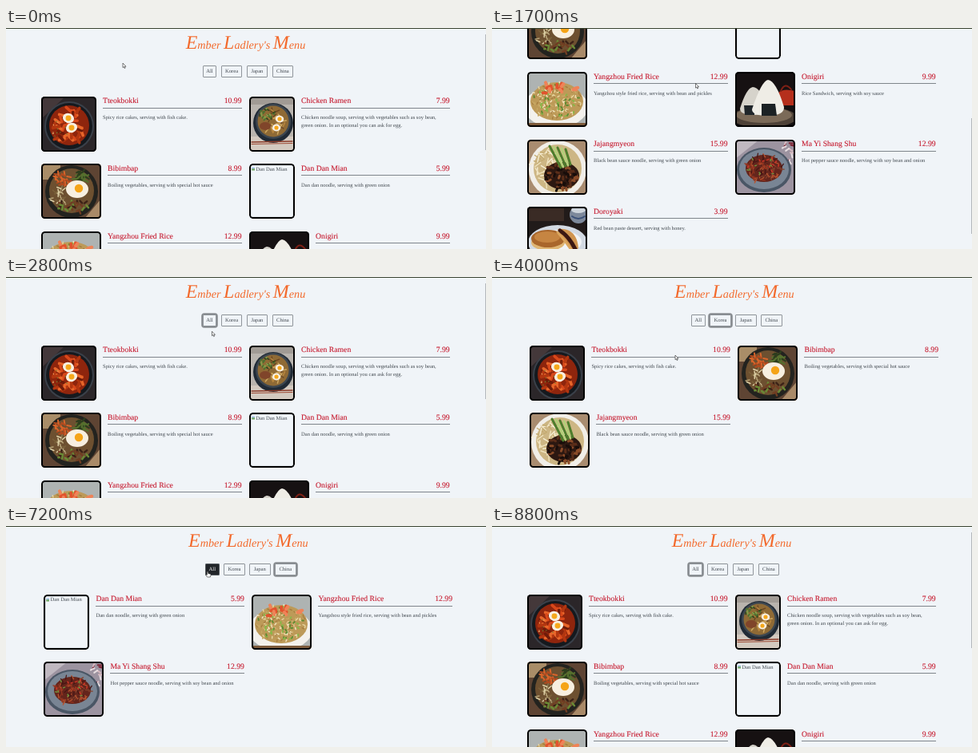
Animation, 600 px wide and 277 px high, one loop 8.9 s. Source, as an HTML page:

```html
<!DOCTYPE html>
<html lang="en">
<head>
<meta charset="utf-8">
<title>Menu</title>
<style>
html, body { margin: 0; width: 100%; height: 100%; overflow: hidden; background: #f0f4f8; }
#stage { position: relative; width: 600px; height: 277px; overflow: hidden; background: #f0f4f8;
  font: 6.6px/9.6px "Liberation Serif", serif; color: #41484f; text-rendering: geometricPrecision; }
#stage * { box-sizing: border-box; }
#page, #view { position: absolute; left: 0; top: 0; width: 600px; height: 500px; }
h1 { position: absolute; left: 200px; top: 7.6px; width: 199px; margin: 0; text-align: center; white-space: nowrap;
  font: italic 14.2px/28px "Liberation Serif", serif; color: #f3692b; }
h1 b { font-size: 24px; font-weight: 400; line-height: 20px; }
.btn { position: absolute; top: 47px; height: 15.4px; text-align: center; line-height: 16px; color: #41484f;
  border-radius: 2px; box-shadow: inset 0 0 0 .7px #6a7076; }
.btn.focus { box-shadow: inset 0 0 0 .7px #6a7076, 0 0 0 1.8px rgba(33, 37, 41, .5); }
.btn.hover { background: #212529; color: #fff; }
.card { position: absolute; height: 69px; width: 250.5px; white-space: pre; }
.pic { position: absolute; left: 0; top: 0; height: 69px; border-radius: 4.5px; overflow: hidden; }
.pic svg { display: block; }
.pic::after { content: ""; position: absolute; inset: 0; border: 2px solid #000; border-radius: 4.5px; }
.head { position: absolute; right: 0; top: .7px; height: 14.3px; display: flex; justify-content: space-between;
  font-size: 9.7px; line-height: 12px; color: #c5172c; -webkit-text-stroke: .1px;
  border-bottom: 1px solid #7f858b; }
.desc { position: absolute; top: 22.6px; }
.alt { position: absolute; left: 8.2px; top: 2.4px; }
#bar { position: absolute; left: 598.8px; width: 1.2px; height: 145px; background: #b4b8bc; }
#edge { position: absolute; left: 0; top: 0; width: 600px; height: 1.2px; background: #39432f; }
#mouse { position: absolute; left: 0; top: 0; overflow: visible; }
</style>
</head>
<body>
<div id="stage">
  <div id="page">
    <div id="view"><h1><b>E</b>mber <b>L</b>adlery's <b>M</b>enu</h1></div>
  </div>
  <div id="bar"></div>
  <div id="edge"></div>
  <svg id="mouse" width="10" height="10">
    <path id="arrow" d="M0 0V5.6L1.3 4.5L2.2 6.5L3.1 6.1L2.3 4.2H4Z" fill="#fff" stroke="#222" stroke-width=".6"/>
    <path id="hand" d="M-.7 .5Q0 -.6 .7 .5V2.4L3.6 3.2Q4.2 3.5 4 4.6L3.3 7H-.4L-2.4 4.4Q-2.2 3.4 -.7 4.4Z"
      fill="#fff" stroke="#222" stroke-width=".6"/>
  </svg>
</div>
<script>
const LOOP = 8900, STEP = 100, MAX_SCROLL = 223;
const $ = id => document.getElementById(id);

// --- dish pictures -------------------------------------------------
const oval = (x, y, rx, ry, fill, more = '') =>
  `<ellipse cx="${x}" cy="${y}" rx="${rx}" ry="${ry}" fill="${fill}" ${more}/>`;
const disc = (x, y, r, fill) => oval(x, y, r, r, fill);
const box = (x, y, w, h, fill) => `<rect x="${x}" y="${y}" width="${w}" height="${h}" fill="${fill}"/>`;
const shape = (d, fill) => `<path d="${d}" fill="${fill}"/>`;
const line = (d, color, w) => `<path d="${d}" fill="none" stroke="${color}" stroke-width="${w}" stroke-linecap="round"/>`;
const egg = (x, y, r, turn) =>
  oval(x, y, r * 1.2, r, '#f8f0e2', `transform="rotate(${turn} ${x} ${y})"`) + disc(x, y, r * .58, '#f5a81c');

function rng(seed) {
  return () => (seed = (seed * 16807) % 2147483647) / 2147483647;
}

// short random strokes spread over an ellipse
function bits(seed, n, x, y, rx, ry, colors, len, w) {
  const rand = rng(seed * 7919);
  let out = '';
  for (let i = 0; i < n; i++) {
    const a = rand() * 6.283, r = Math.sqrt(rand()), turn = rand() * 6.283;
    const px = x + rx * r * Math.cos(a), py = y + ry * r * Math.sin(a);
    const dx = len * Math.cos(turn), dy = len * Math.sin(turn);
    out += line(`M${px.toFixed(1)} ${py.toFixed(1)}l${dx.toFixed(1)} ${dy.toFixed(1)}`, colors[i % colors.length], w);
  }
  return out;
}

const art = {
  tteok: () => box(0, 0, 69, 69, '#2b2629') + shape('M0 0H30L0 28Z', '#44383a') +
    disc(35, 37, 31, '#3a4049') + disc(35, 37, 29, '#15191e') + disc(35, 36, 25, '#8e250d') +
    bits(3, 40, 34, 36, 20, 20, ['#d9481a', '#b23610', '#e8662a', '#6e1b0a'], 7, 3.6) +
    bits(8, 14, 26, 40, 14, 12, ['#6f8b35', '#f0b070'], 1, 1) +
    egg(34, 27, 6, 20) + egg(38, 39, 6, -20),
  ramen: () => box(0, 0, 57, 69, '#b9b4ae') + box(0, 0, 57, 10, '#a19b95') + box(0, 50, 57, 19, '#d3c9bf') +
    disc(30, 33, 25, '#202a35') + disc(30, 31, 22, '#3c4650') + disc(30, 31, 19.5, '#8f6a35') +
    bits(5, 30, 30, 31, 15, 15, ['#cfa860', '#b8863e', '#6a4522'], 5, 1.5) +
    bits(6, 22, 23, 22, 10, 7, ['#4c702f', '#7f9c48', '#37471f'], 2, 2) + oval(20, 37, 7, 5, '#80452a') +
    egg(38, 28, 4.4, 10) + egg(34, 39, 4.4, 0) +
    line('M3 57L54 56', '#8b3a28', 1.3) + line('M3 59.5L54 58.5', '#9d4a34', 1.1),
  bibim: () => box(0, 0, 75, 69, '#5e4433') + box(0, 0, 24, 20, '#a98d68') + shape('M54 69L75 44V69Z', '#a98a68') +
    disc(38, 35, 33, '#23231f') + disc(38, 34, 28, '#6d5030') +
    bits(2, 24, 26, 20, 10, 8, ['#d8642a', '#b24a1e'], 5, 2) +
    bits(4, 26, 50, 15, 10, 6, ['#55702e', '#2d3d1d'], 5, 2.2) +
    bits(7, 24, 21, 40, 9, 10, ['#b5a276', '#dccfa5', '#7a613a'], 5, 1.5) +
    bits(9, 30, 40, 53, 17, 7, ['#3c2217', '#6a8a35', '#713d22'], 4, 2.4) +
    oval(45, 32, 14, 11, '#f7efe0') + disc(47, 31, 5.2, '#f5a417'),
  rice: () => box(0, 0, 75, 69, '#aeb3b2') + oval(36, 44, 40, 26, '#f3f1ec') + oval(37, 37, 33, 24, '#bd9a58') +
    bits(11, 150, 37, 37, 32, 23, ['#e8d6a0', '#c9a964', '#f2e6c2', '#a67d40'], 2.4, 1.4) +
    bits(12, 42, 37, 36, 30, 21, ['#5f8c33', '#8ab548'], 2, 2) +
    bits(13, 12, 37, 20, 28, 9, ['#e2532d', '#ef8358'], 4, 4) + box(0, 64, 75, 5, '#7c5a3a'),
  onigiri: () => box(0, 0, 75, 69, '#161112') + shape('M54 26Q60 20 75 24V42H58Z', '#b52f1c') +
    line('M57 24Q62 12 70 22', '#7e2015', 2) + oval(36, 57, 41, 13, '#4e4238') + oval(36, 54, 35, 10, '#7b6a58') +
    shape('M6 46Q14 20 22 19Q32 19 40 46Q38 54 24 54Q6 54 6 46Z', '#d6d3cb') + shape('M11 42H24V54H12Z', '#20262a') +
    shape('M21 47Q33 11 41 10Q51 11 61 44Q62 54 42 55Q21 55 21 47Z', '#efede6') +
    shape('M33 40H50L52 55H33Z', '#1c2224'),
  jajang: () => box(0, 0, 75, 69, '#a98c70') + disc(38, 37, 36, '#f1eee8') + disc(38, 36, 30, '#cdb684') +
    bits(14, 55, 26, 32, 18, 20, ['#efe2bd', '#c4aa70', '#f6edd2'], 9, 1.4) +
    oval(43, 45, 22, 17, '#2c1811') +
    bits(15, 56, 42, 46, 20, 16, ['#5a2d19', '#180d0a', '#8a4b28'], 3, 3) +
    [0, 1, 2, 3, 4].map(i => line(`M${28 + i * 5} ${8 + i}L${42 + i * 3} ${35 - i}`, i % 2 ? '#b3cf79' : '#4e7d2c', 3)).join(''),
  mayi: () => box(0, 0, 75, 69, '#9c93a0') + shape('M0 0H30L0 24Z', '#c0b8c0') +
    bits(16, 16, 65, 18, 9, 17, ['#e6dde0', '#7e2636', '#d7b9c0'], 5, 2) +
    oval(36, 38, 34, 28, '#4a5665') + oval(36, 37, 31, 25, '#798594') + oval(36, 36, 23, 17, '#64251c') +
    bits(17, 85, 36, 36, 22, 16, ['#95341f', '#471614', '#b9532f', '#83412b'], 5, 1.3) +
    bits(18, 20, 36, 35, 20, 14, ['#6f8f3c', '#cf3527'], 2, 1.5),
  dora: () => box(0, 0, 75, 69, '#211b1a') + box(0, 0, 46, 18, '#3a2b25') + disc(64, 10, 11, '#7d899b') +
    oval(64, 4, 9, 4, '#cdd4db') + line('M56 12Q64 18 72 12', '#3c5279', 2) +
    oval(38, 45, 37, 22, '#d3dae3') + oval(38, 44, 30, 15, '#f1f3f5') +
    bits(19, 24, 38, 60, 28, 5, ['#6d84ac', '#a9b9d2'], 3, 1.2) +
    oval(26, 45, 21, 10, '#dfb573') + oval(26, 40, 21, 11, '#a9662b') + oval(25, 38, 16, 7, '#c68542') +
    shape('M38 28Q62 26 64 52Q58 58 52 50Z', '#d09550') + line('M41 30Q52 37 60 53', '#3a1713', 5) +
    line('M38 32Q46 41 55 54', '#dba65e', 3),
  none: () => box(0, 0, 57, 69, '#f0f4f8') + '<rect x="2.2" y="2.2" width="52.6" height="64.6" fill="none" stroke="#c2c7cc" stroke-width=".5"/>' +
    box(2.8, 4, 4.6, 5, '#fff') + box(3.2, 6, 3.8, 2.6, '#72a86a') + box(3.2, 4.4, 3.8, 1.8, '#a9c4ea')
};

// name, price, text, category, picture, picture width
const dishes = [
  ['Tteokbokki', '10.99', 'Spicy rice cakes, serving with fish cake.', 1, 'tteok', 69],
  ['Chicken Ramen', '7.99', 'Chicken noodle soup, serving with vegetables such as soy bean,\ngreen onion. In an optional you can ask for egg.', 2, 'ramen', 57],
  ['Bibimbap', '8.99', 'Boiling vegetables, serving with special hot sauce', 1, 'bibim', 75],
  ['Dan Dan Mian', '5.99', 'Dan dan noodle, serving with green onion', 3, 'none', 57],
  ['Yangzhou Fried Rice', '12.99', 'Yangzhou style fried rice, serving with bean and pickles', 3, 'rice', 75],
  ['Onigiri', '9.99', 'Rice Sandwich, serving with soy sauce', 2, 'onigiri', 75],
  ['Jajangmyeon', '15.99', 'Black bean sauce noodle, serving with green onion', 1, 'jajang', 75],
  ['Ma Yi Shang Shu', '12.99', 'Hot pepper sauce noodle, serving with soy bean and onion', 3, 'mayi', 75],
  ['Doroyaki', '3.99', 'Red bean paste dessert, serving with honey.', 2, 'dora', 75]
];

function add(cls, html) {
  const el = document.createElement('div');
  el.className = cls;
  el.innerHTML = html;
  $('view').append(el);
  return el;
}

const cards = dishes.map(([name, price, text, cat, pic, w]) => ({
  cat,
  el: add('card',
    `<div class="pic" style="width:${w}px"><svg width="${w}" height="69">${art[pic]()}</svg>` +
    (pic === 'none' ? `<span class="alt">${name}</span>` : '') + '</div>' +
    `<div class="head" style="left:${w + 8}px"><span>${name}</span><span>${price}</span></div>` +
    `<div class="desc" style="left:${w + 8}px">${text}</div>`)
}));

const buttons = [['All', 245.5, 17.8], ['Korea', 268.8, 26.6], ['Japan', 300.6, 26.6], ['China', 332.6, 26.6]]
  .map(([label, x, w]) => {
    const el = add('btn', label);
    el.style.left = x + 'px';
    el.style.width = w + 'px';
    return { el, x, w };
  });

// --- timeline ------------------------------------------------------
// time, filter, focused button
const clicks = [[0, 0, -1], [900, 0, 0], [3300, 1, 1], [5100, 2, 2], [5900, 3, 3], [7300, 0, 0]];
const scrolls = [[0, 0], [1200, 0], [1300, 2.2], [1800, MAX_SCROLL], [2250, MAX_SCROLL], [2700, 0],
  [7450, 0], [7900, MAX_SCROLL], [8100, MAX_SCROLL], [8500, 0]];
const path = [[0, 146, 44], [200, 146, 44], [800, 250, 56], [1400, 250, 56], [1700, 254.5, 69.5], [2700, 254.5, 69.5],
  [3200, 283, 56], [3500, 283, 56], [4000, 229, 98], [4400, 415, 108], [5000, 317, 54], [5400, 317, 54],
  [5800, 348, 56], [6200, 348, 56], [6600, 300, 110], [6800, 300, 110], [7100, 252, 57], [7400, 252, 57],
  [7700, 262, 90], [8100, 268, 150], [8500, 300, 300]];

function at(keys, t) {
  const i = keys.findIndex(k => k[0] > t);
  if (i < 0) return keys[keys.length - 1].slice(1);
  const a = keys[i - 1], b = keys[i], p = (t - a[0]) / (b[0] - a[0]), e = p * p * (3 - 2 * p);
  return a.slice(1).map((v, j) => v + (b[j + 1] - v) * e);
}

let shown = -1;
function layout(filter) {
  if (filter === shown) return;
  shown = filter;
  let n = 0;
  for (const { cat, el } of cards) {
    const on = !filter || cat === filter;
    el.style.display = on ? '' : 'none';
    if (!on) continue;
    el.style.left = 44 + (n % 2) * 260.1 + 'px';
    el.style.top = 85.8 + Math.floor(n / 2) * 84.6 + 'px';
    n++;
  }
}

function draw(t) {
  const [, filter, focus] = clicks.filter(c => c[0] <= t).pop();
  const [scroll] = at(scrolls, t), [mx, my] = at(path, t);
  const shift = filter ? 3.4 : 0;
  layout(filter);
  $('view').style.left = shift + 'px';
  $('page').style.top = -scroll + 'px';
  $('bar').style.display = filter ? 'none' : '';
  $('bar').style.top = 8 + 117 * scroll / MAX_SCROLL + 'px';

  let over = false;
  buttons.forEach(({ el, x, w }, i) => {
    const dx = mx - x - shift, dy = my + scroll - 47;
    const hit = dx >= 0 && dx <= w && dy >= 0 && dy <= 15;
    el.classList.toggle('hover', hit);
    el.classList.toggle('focus', i === focus);
    over = over || hit;
  });
  $('arrow').style.display = over ? 'none' : '';
  $('hand').style.display = over ? '' : 'none';
  $('mouse').style.transform = `translate(${mx}px, ${my}px)`;
}

const start = performance.now();
function tick() {
  const t = (performance.now() - start) % LOOP;
  draw(Math.floor(t / STEP) * STEP);
  requestAnimationFrame(tick);
}
tick();
</script>
</body>
</html>
```
